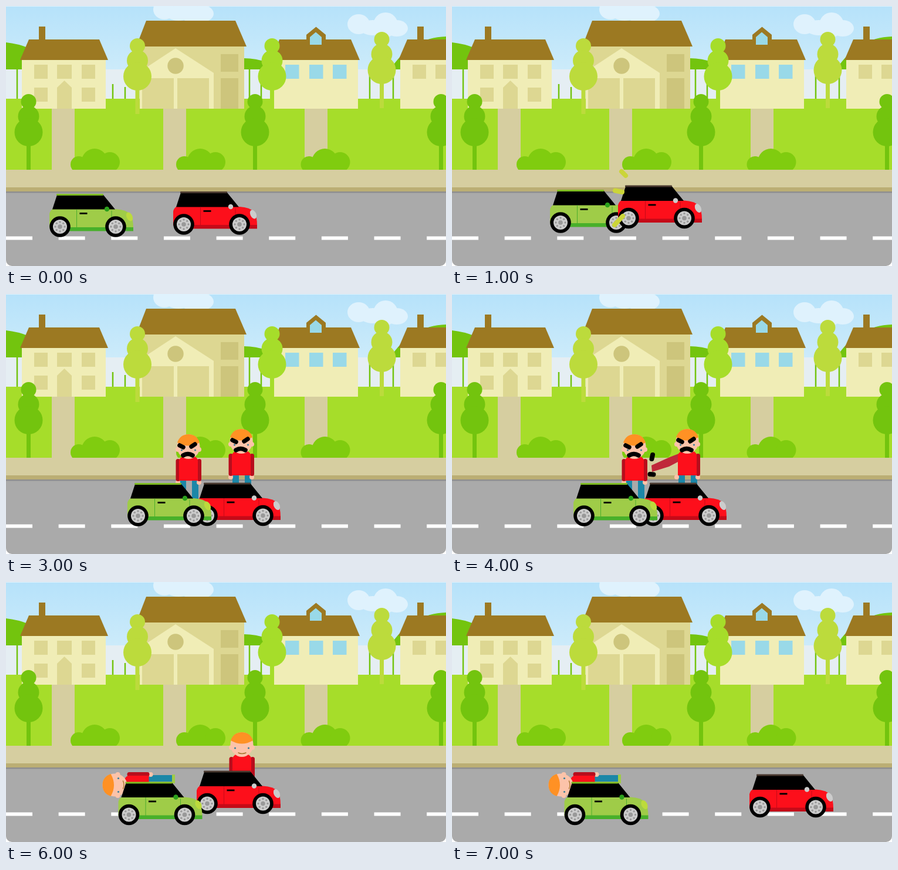
Animation, 750 px wide and 443 px high, one loop 8000 ms. Source, as an HTML page:

```html
<!DOCTYPE html>
<html lang="en">
<head>
<meta charset="utf-8">
<title>Fender bender</title>
<style>
  html, body { margin: 0; width: 100%; height: 100%; overflow: hidden; background: #fff; }
  svg { display: block; border-radius: 0 0 10px 10px; }
  text { font: 36.5px "Liberation Sans", Arial, sans-serif; }
</style>
</head>
<body>
<svg id="stage" width="750" height="443" viewBox="0 0 750 443"></svg>
<script>
const CREAM = '#f0edb6', TAN = '#ddd792', KHAKI = '#cdc57c', ROOF = '#9c7922', GLASS = '#99d9e8';
const LEAF = '#73c40e', LIME = '#bcdb3c', GRASS = '#a6dd2a', PATH = '#d6cea0', SKIN = '#fcc3a9';

const rect = (x, y, w, h, fill, rx = 0) =>
  `<rect x="${x}" y="${y}" width="${w}" height="${h}" rx="${rx}" fill="${fill}"/>`;
const oval = (x, y, rx, ry, fill) =>
  `<ellipse cx="${x}" cy="${y}" rx="${rx}" ry="${ry}" fill="${fill}"/>`;
const disc = (x, y, r, fill) => oval(x, y, r, r, fill);
const shape = (d, fill) => `<path d="${d}" fill="${fill}"/>`;
const line = (d, stroke, width) =>
  `<path d="${d}" fill="none" stroke="${stroke}" stroke-width="${width}" stroke-linecap="round" stroke-linejoin="round"/>`;
const at = (x, y, content, turn = 0) =>
  `<g transform="translate(${x} ${y}) rotate(${turn})">${content}</g>`;
const each = (list, draw) => list.map(draw).join('');

// Scenery
const cloud = (x, y) => at(x, y,
  oval(19, 20, 19, 17, '#dff2fd') + oval(43, 26, 22, 13, '#dff2fd') +
  disc(65, 21, 21, '#dff2fd') + oval(84, 27, 19, 14, '#dff2fd'));

const tree = (x, y, height, fill) => at(x, y,
  disc(0, 13, 13, fill) + disc(0, 38, 18, fill) + disc(0, 65, 24, fill) +
  rect(-3.5, 70, 7, height - 70, fill));

const bush = x => at(x, 243,
  disc(14, 27, 14, '#80cc0f') + disc(41, 22, 22, '#80cc0f') +
  disc(67, 23, 17, '#80cc0f') + rect(8, 25, 70, 11, '#80cc0f'));

const house = x => at(x, 0,
  rect(3, 92, 143, 83, CREAM) + shape('M15 57H135L150 92H0Z', ROOF) + rect(32, 35, 11, 24, ROOF) +
  each([24, 63, 105], wx => rect(wx, 100, wx === 63 ? 25 : 23, 24, TAN)));

const background =
  `<linearGradient id="sky" x2="0" y2="1"><stop stop-color="#b6e2fa"/><stop offset="1" stop-color="#ccebfa"/></linearGradient>` +
  rect(0, 0, 750, 108, 'url(#sky)') + rect(0, 0, 750, 1, '#dff1fb') +
  rect(0, 108, 750, 51, '#e5eef3') +
  cloud(582, 11) + cloud(251, -14) +
  shape('M0 62Q20 64 40 72V108H0ZM400 89Q424 88 445 96V108H400ZM655 108Q690 54 750 52V108Z', LEAF) +
  each([19, 415, 435, 620, 660], x => rect(x - 1.25, 100, 2.5, 60, LEAF)) +
  each([182, 203], x => rect(x - 1.25, x < 200 ? 133 : 138, 2.5, 26, LEAF)) +
  rect(0, 158, 750, 121, GRASS) +
  each([78, 268, 509], x => rect(x, 174, 39, 106, PATH)) +
  // left house
  house(24) + each([48, 129], x => rect(x, 139, 23, 24, TAN)) +
  shape('M87 175V139L99.5 127L112 139V175Z', TAN) +
  // garage house
  rect(228, 68, 178, 107, TAN) + shape('M239 25H391L410 69H222Z', ROOF) +
  shape('M228 175V112L289 72L354 114V175Z', CREAM) + disc(289, 102, 13.7, KHAKI) +
  rect(232, 123, 54, 52, TAN) + rect(292, 123, 54, 52, TAN) +
  rect(366, 82, 30, 30, KHAKI) + rect(366, 123, 30, 52, KHAKI) +
  // house with dormer
  rect(457, 92, 143, 83, CREAM) + shape('M466 57H588L603 92H453Z', ROOF) +
  shape('M512 49L528.5 35.5L545 49V67H512Z', ROOF) + shape('M518 66V53L528 44.5L538 53V66Z', GLASS) +
  each([476, 517, 557], x => rect(x, 100, 23.5, 24, GLASS)) +
  house(669) +
  tree(224, 55, 129, LIME) + tree(453.5, 55, 120, GRASS) + tree(640.5, 44, 130, LIME) +
  each([110, 290, 502.5], bush) +
  each([38.5, 424.5, 741.5], x => tree(x, 150, 129, LEAF)) +
  // pavement and road
  rect(0, 279, 750, 31, PATH) + rect(0, 309, 750, 7, '#bbae74') +
  rect(0, 316, 750, 3, '#8f8f8f') + rect(0, 318.5, 750, 125, '#aaa') +
  each([...Array(9).keys()], i => rect(i * 89.65, 392.5, 45, 6, '#fff'));

// Cars
const wheel = x => at(x, 56,
  disc(0, 0, 17.8, '#000') + disc(0, 0, 12, '#ccc') + disc(0, 0, 3.8, '#999') +
  each([...Array(8).keys()], i =>
    disc(8 * Math.cos(i * Math.PI / 4), 8 * Math.sin(i * Math.PI / 4), 1.7, '#999')));

const car = ({ body, trim, roof, seam, mirror, lamp }) => (x, y) => at(x, y,
  shape('M5 26H113Q131 27 138 35Q143 43 143 58H0V34Q1 29 5 26Z', body) +
  rect(5, 57, 138, 6.5, trim) +
  shape('M13 2H92L112 26.5H5Z', '#000') + rect(12, 0, 80, 3, roof, 1) +
  line('M46.5 27V57M106 29V57', seam, 1) + rect(51.5, 32, 13, 2.8, '#000') +
  at(136.5, 39, oval(0, 0, 5, 8, lamp), -25) + disc(98, 26, 4.2, mirror) +
  wheel(18) + wheel(113));

const greenCar = car({ body: '#9fcc48', trim: '#48b02a', roof: '#7fbc22', seam: '#4cae2c', mirror: '#2ca01c', lamp: LIME });
const redCar = car({ body: '#fd0f1b', trim: '#c50a18', roof: '#4a3a30', seam: '#c50a18', mirror: '#ccc', lamp: '#ccc' });

// People, placed by the centre of the head
const anger = line('M-15 -2L-9 1M5 0L11 -4', '#000', 7.5) + line('M-9 15Q-1 10 7 15', '#000', 7.5);
const sleeve = x => rect(x - 3.5, 21, 7.5, 38, '#b80d1c', 3.5);

const man = (x, y, { angry = false, reaching = false, turn = 0 } = {}) => at(x, y,
  rect(-15, 56, 11, 42, '#1b87a8') + rect(6, 56, 11, 42, '#1b87a8') +
  disc(-18, 61, 4, SKIN) + disc(18, 61, 4, SKIN) +
  (reaching ? '' : sleeve(-18)) + sleeve(18) +
  (reaching ? shape('M-12 20L-30 27L-61 41L-60 52L-31 43L-12 33Z', '#c0283a') : '') +
  shape('M-16 58V24Q-15 19 -9 16H9Q16 19 16 24V58Z', '#fd0f1b') +
  disc(-18, 5, 4, SKIN) + disc(18, 5, 4, SKIN) + oval(0, 0, 19.5, 21, SKIN) +
  shape('M-19 -7Q-14 -21 0 -21Q14 -21 19 -7Q0 4 -19 -7Z', '#ff9124') +
  disc(-11.5, 6, 1.6, '#3a7f9a') + disc(11.5, 6, 1.6, '#3a7f9a') +
  (angry ? anger : line('M-6 14Q0 17 7 14', '#a5742c', 1.4)), turn);

const knockedOut = man(185.5, 346, { turn: -90 }) + rect(283, 328, 5, 15, '#9fcc48') + greenCar(191.5, 340.5);
const stopped = redCar(325, 321.5) + greenCar(207, 322);
const angry = { angry: true };

// One still per second
const scenes = [
  greenCar(74, 320) + redCar(285, 316),
  greenCar(167, 313) + redCar(283, 305.5) +
    line('M289 282L296 289M278 314.5L290 317M277 373L291 358', '#cbd539', 8),
  man(311, 260) + man(401, 251) + stopped + '<text x="425.5" y="236">DUDE WTF???</text>',
  man(311, 260, angry) + man(401, 251, angry) + stopped,
  man(311, 260, angry) + man(401, 251, { angry: true, reaching: true }) + stopped +
    line('M342 274L340.5 281M337.5 307L343.5 307.5', '#000', 8),
  man(401, 251, angry) + redCar(325, 321.5) + knockedOut,
  man(402, 277) + redCar(325, 321.5) + knockedOut,
  knockedOut + redCar(507, 327.5)
];

const stage = document.getElementById('stage');
stage.innerHTML = background + '<g id="scene"></g>';
const sceneLayer = document.getElementById('scene');
let shown = -1;

function draw() {
  const index = Math.floor(performance.now() / 1000) % scenes.length;
  if (index !== shown) sceneLayer.innerHTML = scenes[shown = index];
  requestAnimationFrame(draw);
}
draw();
</script>
</body>
</html>
```
